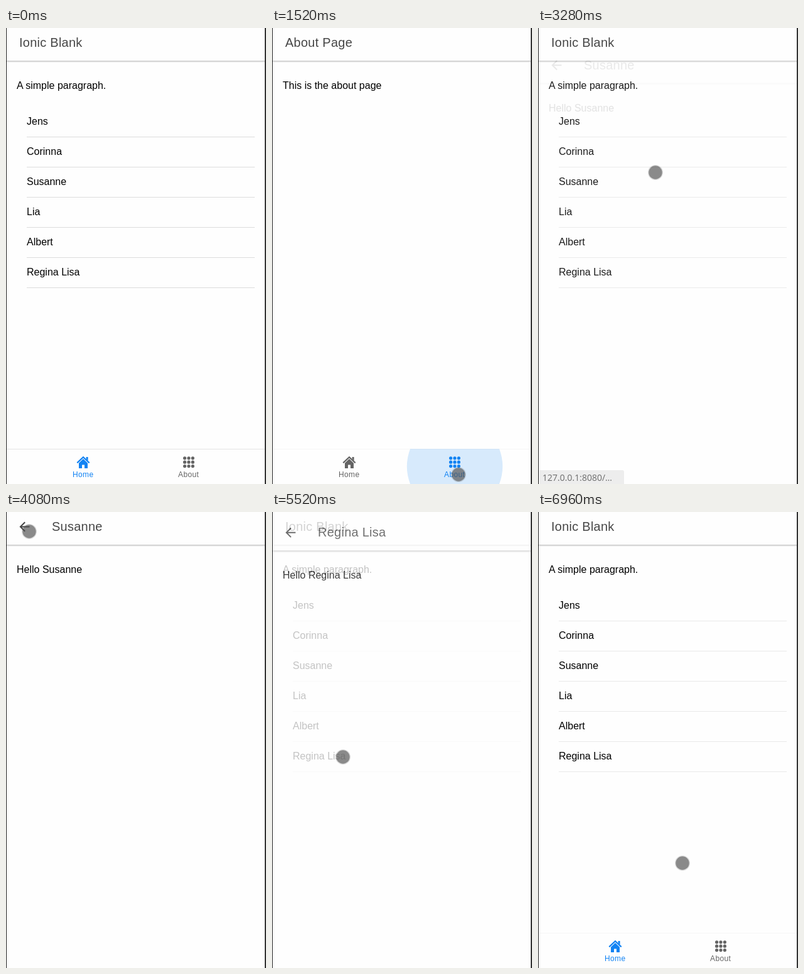
These frames come from a looping animation (414x726 px, 7200 ms). An HTML page:

```html
<!DOCTYPE html>
<html lang="en">
<head>
<meta charset="utf-8">
<title>Tabs and detail pages</title>
<style>
  html, body { margin: 0; width: 100%; height: 100%; overflow: hidden; background: #fefefe; }
  svg { display: block; width: 414px; height: 726px; font: 16px "Liberation Sans", Arial, sans-serif; --rule: #e9e9e9; --bar: #f6f6f6; }
  svg.crisp { --rule: #dcdcdc; --bar: #e4e4e4; }
  .title { font-size: 20px; letter-spacing: .0125em; fill: #474747; }
  .rule { stroke: var(--rule); }
  .tab { fill: #646464; stroke: #646464; }
  .tab.on { fill: #1283f3; stroke: #1283f3; }
  .tab * { stroke: none; }
  .tab .roof { fill: none; stroke: inherit; stroke-width: 2.2; }
  .tab text { font-size: 12px; letter-spacing: .03em; text-anchor: middle; }
  .status { font: 14px "Open Sans", "Noto Sans", sans-serif; fill: #6c6c6c; }
</style>
</head>
<body>
<svg id="stage" viewBox="0 0 414 726">
  <defs>
    <clipPath id="barClip"><rect y="670" width="414" height="56"/></clipPath>
    <g id="sheet">
      <rect width="414" height="726" fill="#fefefe"/>
      <path d="M0 52.5H414" stroke="#000" stroke-opacity=".2"/>
      <path d="M0 53.5H414" stroke="#000" stroke-opacity=".13"/>
      <path d="M0 54.5H414" stroke="#000" stroke-opacity=".05"/>
    </g>
  </defs>

  <g id="home">
    <use href="#sheet"/>
    <text class="title" x="21" y="30">Ionic Blank</text>
    <text x="17" y="97">A simple paragraph.</text>
    <g id="list"></g>
  </g>

  <g id="about">
    <use href="#sheet"/>
    <text class="title" x="21" y="30">About Page</text>
    <text x="17" y="97">This is the about page</text>
  </g>

  <g id="detail">
    <use href="#sheet"/>
    <path d="M37.5 22.5v2h-12.2l5.6 5.6-1.4 1.4-8-8 8-8 1.4 1.4-5.6 5.6z" fill="#424242"/>
    <text class="title" id="detailTitle" x="73" y="30"></text>
    <text id="greeting" x="17" y="97"></text>
  </g>

  <g id="tabs">
    <rect y="670" width="414" height="56" fill="#fefefe"/>
    <path d="M0 670.5H414" stroke="var(--bar)"/>
    <g class="tab" id="homeTab">
      <path class="roof" d="M113.3 692.4L123 683.3l9.7 9.1"/>
      <path d="M127.6 683h3v6l-3-3zM116 692.7l7-6.6 7 6.6v8.3h-5v-5.6h-4v5.6h-5z"/>
      <text x="122.7" y="715">Home</text>
    </g>
    <g class="tab" id="aboutTab">
      <g id="dots"></g>
      <text x="290.7" y="715">About</text>
    </g>
    <g clip-path="url(#barClip)"><circle id="ripple" cy="698" fill="#1283f3"/></g>
  </g>

  <g id="status">
    <path d="M0 704H134q3 0 3 3V726H0z" fill="#ededed"/>
    <text class="status" x="7" y="721">127.0.0.1:8080/…</text>
  </g>

  <path d="M.5 0V726" stroke="#222"/>
  <path d="M413 0V726" stroke="#333" stroke-width="2"/>
  <g id="cursor">
    <circle r="12" fill="#505050" opacity=".2"/>
    <circle r="10.7" fill="#505050" opacity=".58"/>
  </g>
</svg>
<script>
const LOOP = 7200, STEP = 80;
const el = id => document.getElementById(id);
const show = (id, visible) => { el(id).style.display = visible ? "" : "none"; };
const clamp = v => Math.min(1, Math.max(0, v));
const mix = (a, b, k) => a + (b - a) * k;
const smooth = k => k * k * (3 - 2 * k);

// CSS-style cubic Bézier easing, solved by bisection
const bezier = (x1, y1, x2, y2) => x => {
  const at = (a, b, u) => 3 * a * u * (1 - u) ** 2 + 3 * b * u * u * (1 - u) + u ** 3;
  let low = 0, high = 1;
  for (let i = 0; i < 24; i++) {
    const mid = (low + high) / 2;
    if (at(x1, x2, mid) < x) low = mid; else high = mid;
  }
  return at(y1, y2, high);
};
const enterEase = bezier(.36, .66, .04, 1);
const leaveEase = bezier(.47, 0, .745, .715);
const rippleEase = bezier(.4, 0, .2, 1);

const people = ["Jens", "Corinna", "Susanne", "Lia", "Albert", "Regina Lisa"];
el("list").innerHTML = people.map((name, i) =>
  `<text x="33" y="${154 + 48 * i}">${name}</text>
   <path class="rule" d="M33 ${173.5 + 48 * i}H396"/>`).join("");
el("dots").innerHTML = Array.from({ length: 9 }, (_, i) =>
  `<circle cx="${284.6 + 6.4 * (i % 3)}" cy="${684.8 + 6.4 * Math.floor(i / 3)}" r="2.6"/>`).join("");

const aboutOpen = 1400, aboutClose = 1840;
const visits = [
  { name: people[2], open: 3265, back: 4160 },
  { name: people[5], open: 5440, back: 6640 },
];
const ripples = [
  { x: 291, start: aboutOpen, release: 1620 },
  { x: 123, start: aboutClose, release: 1940 },
];
// time, x, y
const cursorPath = [
  [320, 426, 600], [960, 297, 711], [1600, 297, 711], [1840, 137, 703],
  [2300, 137, 703], [2960, 187, 230], [3380, 187, 230], [3960, 37, 31],
  [4240, 37, 31], [4800, 113, 364], [4960, 113, 364], [5200, 113, 390],
  [5560, 113, 390], [6080, 41, 54], [6240, 37, 36], [6400, 37, 31],
  [6640, 37, 31], [6960, 230, 559],
];

function drawDetail(t) {
  const visit = visits.find(v => t >= v.open && t < v.back + 200);
  show("detail", visit);
  show("tabs", !visit || t >= visit.back);
  if (!visit) return;
  const shown = t < visit.back
    ? enterEase(clamp((t - visit.open) / 280))
    : 1 - leaveEase((t - visit.back) / 200);
  el("detail").setAttribute("opacity", shown);
  el("detail").setAttribute("transform", `translate(0 ${40 * (1 - shown)})`);
  el("detailTitle").textContent = visit.name;
  el("greeting").textContent = "Hello " + visit.name;
}

function drawRipple(t) {
  const ripple = ripples.find(r => t >= r.start && t < r.release + 150);
  show("ripple", ripple);
  if (!ripple) return;
  const age = t - ripple.start;
  const fade = clamp(age / 75) * (1 - clamp((t - ripple.release) / 150));
  el("ripple").setAttribute("cx", ripple.x);
  el("ripple").setAttribute("r", mix(42, 84, rippleEase(clamp(age / 225))));
  el("ripple").setAttribute("opacity", .16 * fade);
}

function drawCursor(t) {
  show("cursor", t >= cursorPath[0][0]);
  const next = cursorPath.findIndex(p => p[0] > t);
  const b = cursorPath.at(next), a = next > 0 ? cursorPath[next - 1] : b;
  const k = smooth(clamp((t - a[0]) / (b[0] - a[0] || 1)));
  el("cursor").setAttribute("transform", `translate(${mix(a[1], b[1], k)} ${mix(a[2], b[2], k)})`);
}

function render(t) {
  const onAbout = t >= aboutOpen && t < aboutClose;
  el("stage").classList.toggle("crisp", t < 320);
  show("about", onAbout);
  el("homeTab").classList.toggle("on", !onAbout);
  el("aboutTab").classList.toggle("on", onAbout);
  show("status", t >= 2800 && t < 3520);
  drawDetail(t);
  drawRipple(t);
  drawCursor(t);
}

const start = performance.now();
function tick() {
  const t = (performance.now() - start) % LOOP;
  render(Math.floor(t / STEP) * STEP);
  requestAnimationFrame(tick);
}
tick();
</script>
</body>
</html>
```
